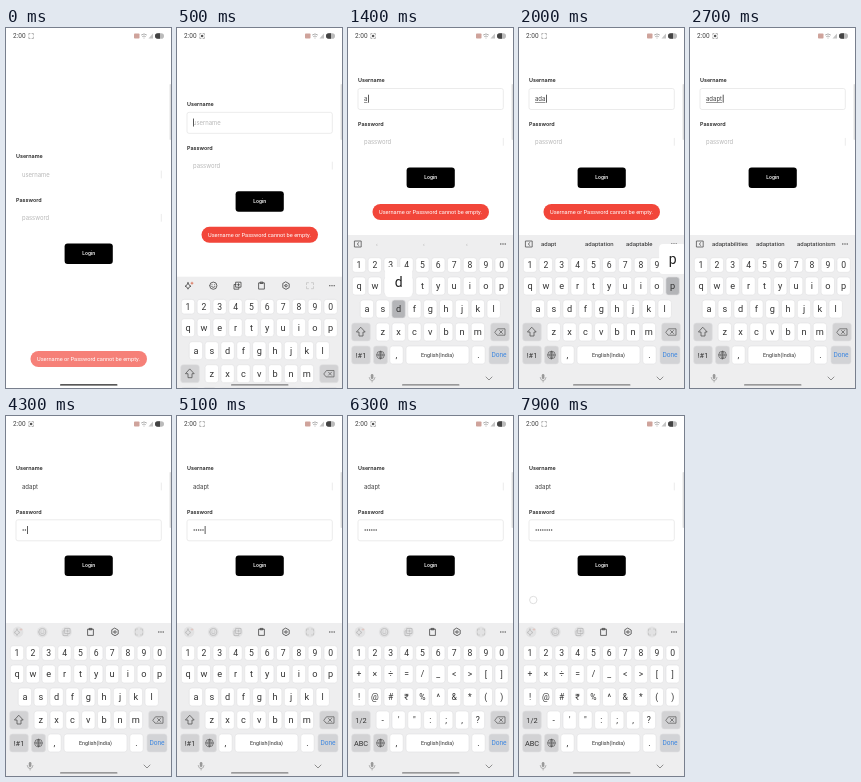
Recreate the animation shown at these times as an HTML page. Size 165x360 px, loop 8000 ms.

```html
<!DOCTYPE html>
<html lang="en">
<head>
<meta charset="utf-8">
<title>Login form</title>
<style>
  html, body { margin: 0; width: 100%; height: 100%; overflow: hidden; background: #fff; }
  svg { display: block; width: 100vw; height: 100vh; }
  text { font-family: Roboto, sans-serif; white-space: pre; }
  .form text { font-family: Inter, sans-serif; }
</style>
</head>
<body>
<svg id="stage" viewBox="0 0 165 360"></svg>
<script>
const LOOP = 8000;
const NAME = "adapt";
const stage = document.getElementById("stage");

function el(parent, tag, attrs = {}, content) {
  const node = document.createElementNS("http://www.w3.org/2000/svg", tag);
  for (const key in attrs) node.setAttribute(key, attrs[key]);
  if (content !== undefined) node.textContent = content;
  parent.append(node);
  return node;
}
const group = (parent, attrs) => el(parent, "g", attrs);
const box = (parent, x, y, width, height, rx, fill, more) =>
  el(parent, "rect", { x, y, width, height, rx, fill, ...more });
const line = (parent, d, stroke = "#333", width = 0.8, more) =>
  el(parent, "path", { d, stroke, "stroke-width": width, fill: "none",
    "stroke-linecap": "round", "stroke-linejoin": "round", ...more });
// y is the vertical middle of the capitals
const label = (parent, s, x, y, size, more) =>
  el(parent, "text", { x, y: y + size * 0.36, "font-size": size, fill: "#222", ...more }, s);
const mid = { "text-anchor": "middle" };
const show = (node, on) => node.setAttribute("opacity", +on);
const move = (node, y) => node.setAttribute("transform", `translate(0 ${y})`);

function track(steps, t) {
  if (t <= steps[0][0]) return steps[0][1];
  for (let i = 1; i < steps.length; i++) {
    const [t0, a] = steps[i - 1], [t1, b] = steps[i];
    if (t < t1) return a + (b - a) * (t - t0) / (t1 - t0);
  }
  return steps[steps.length - 1][1];
}

// Status bar
const status = group(stage);
label(status, "2:00", 7, 8, 6.5, { fill: "#444" });
line(status, "M24 5.5H22.8V7M26 5.5H27.4V7M24 10.5H22.8V9M26 10.5H27.4V9", "#999", 0.7);
const recordDot = el(status, "circle", { cx: 25.1, cy: 8, r: 1.3, fill: "#555" });
box(status, 128, 5.5, 5.5, 5, 0.8, "#cfa39b");
line(status, "M135.5 6.8Q138 4.8 140.5 6.8M136.6 8.4Q138 7.3 139.4 8.4M138 10V10.1", "#999", 0.8);
el(status, "path", { d: "M142.5 10.5L147 5.5V10.5Z", fill: "#c4c4c4" });
box(status, 149, 5.2, 9, 5.6, 2.8, "#bbb");
el(status, "path", { d: "M151.8 5.2H154V10.8H151.8A2.8 2.8 0 0 1 151.8 5.2", fill: "#444" });
box(stage, 163.6, 56, 1.4, 56, 0.7, "#ddd");

// Form
const form = group(stage, { class: "form" });
function makeField(title, hint, y) {
  label(form, title, 10, y + 0.5, 5.4, { "font-weight": 600 });
  const idle = line(form, `M155.3 ${y + 15}V${y + 22}`, "#e2e2e2", 0.7);
  const focus = box(form, 10, y + 8.5, 145.3, 21, 2, "none", { stroke: "#e6e6e6", "stroke-width": 0.8 });
  const textY = y + 18.7;
  return {
    idle, focus,
    hint: label(form, hint, 16, textY, 5.9, { fill: "#b8b8b8" }),
    text: label(form, "", 16, textY, 6, { fill: "#444" }),
    underline: box(form, 16, textY + 3.4, 0, 0.6, 0, "#555"),
    cursor: box(form, 16, textY - 4, 0.8, 8, 0, "#333")
  };
}
const user = makeField("Username", "username", 52);
const pass = makeField("Password", "password", 95.3);
pass.dots = Array.from({ length: 8 }, (_, i) =>
  el(form, "circle", { cx: 17.2 + 2.2 * i, cy: 114, r: 0.75, fill: "#444" }));
box(form, 58.6, 139.5, 48.2, 20.4, 3, "#000");
label(form, "Login", 82.7, 149.6, 4.8, { ...mid, fill: "#fff", "font-weight": 600 });

const spinner = el(stage, "circle", { cx: 14.3, cy: 184, r: 3.7, fill: "#fff", stroke: "#d2d2d2", "stroke-width": 0.7 });
const toast = group(stage);
box(toast, 24.5, 323, 116.5, 16, 8, "#f2463a");
label(toast, "Username or Password cannot be empty.", 82.5, 331, 5.65, { ...mid, fill: "#fff" });

// Keyboard
const board = group(stage);
box(board, 0, 207, 165, 154, 0, "#eeeeef");
const letters = group(board), symbols = group(board);
const keys = {};
function addKey(parent, s, x, y, { w = 13.4, h = 18, fill = "#fff", size = 9.2, ink = "#333" } = {}) {
  const face = box(parent, x - w / 2, y - h / 2, w, h, 2.8, fill, { stroke: "#e0e0e1", "stroke-width": 0.6 });
  if (s) label(parent, s, x, y, size, { ...mid, fill: ink });
  keys[s] = { face, x, y, fill };
}
function addRow(parent, chars, x, y, options) {
  [...chars].forEach((c, i) => addKey(parent, c, x + 15.85 * i, y, options));
}
const grey = { w: 18.6, fill: "#d2d2d4", size: 7.4 };
addRow(letters, "qwertyuiop", 11, 258);
addRow(letters, "asdfghjkl", 18.9, 281);
addRow(letters, "zxcvbnm", 34.8, 304);
addKey(letters, "", 13, 304, grey);
addKey(letters, "!#1", 13, 327, grey);
line(letters, "M13 299.5L17.2 304H15V308H11V304H8.8Z", "#555");
addRow(symbols, "+×÷=/_<>[]", 11, 258, { size: 8.6 });
addRow(symbols, "!@#₹%^&*()", 11, 281, { size: 8.6 });
addRow(symbols, "-'\":;,?", 34.8, 304, { size: 8.6 });
addKey(symbols, "1/2", 13, 304, grey);
addKey(symbols, "ABC", 13, 327, grey);
addRow(board, "1234567890", 11, 237, { h: 14.6, size: 8.6 });
addKey(board, "", 152, 304, grey);
line(board, "M147 304L149.5 300.8H157V307.2H149.5ZM151.5 302.5L154.5 305.5M154.5 302.5L151.5 305.5", "#555", 0.7);
addKey(board, "", 32.5, 327, { ...grey, w: 14 });
line(board, "M28.7 327A3.8 3.8 0 1 0 36.3 327A3.8 3.8 0 1 0 28.7 327H36.3M32.5 323.2Q29.2 327 32.5 330.8Q35.8 327 32.5 323.2V330.8", "#555", 0.7);
addRow(board, ",", 48.5, 327);
addKey(board, "English(India)", 89.5, 327, { w: 63, size: 5.4 });
addRow(board, ".", 130.5, 327);
addKey(board, "Done", 151, 327, { w: 20, fill: "#d2d3d6", size: 6.6, ink: "#3f88e0" });
box(board, 22.8, 346, 2.6, 5, 1.3, "#999");
line(board, "M21.2 349.5Q21.4 352.5 24.1 352.5Q26.8 352.5 27 349.5M24.1 352.5V354", "#999", 0.7);
line(board, "M138 349L141 352L144 349", "#777");

// Toolbar: icons or word suggestions
const tools = group(board), faded = group(tools), words = group(board);
const icon = (parent, x, d, stroke = "#444") =>
  line(parent, d, stroke, 0.8, { transform: `translate(${x} 216)` });
const ringPath = r => `M${-r} 0A${r} ${r} 0 1 0 ${r} 0A${r} ${r} 0 1 0 ${-r} 0`;
const discs = group(tools);
[12, 36.3, 60.5, 133].forEach(cx => el(discs, "circle", { cx, cy: 216, r: 5.4, fill: "#e2e2e3" }));
tools.prepend(discs);
icon(faded, 12, "M-1 -3Q-.5 0 2 .5Q-.5 1 -1 3.5Q-1.5 1 -4 .5Q-1.5 0 -1 -3Z");
icon(faded, 12, "M3 -3.5V-1.5M2 -2.5H4", "#d8684c");
icon(faded, 36.3, ringPath(3.6) + "M-1.3 -1V-.9M1.3 -1V-.9M-1.7 1Q0 2.6 1.7 1");
icon(faded, 60.5, "M-1.5 -3.5H3.5V1.5H-1.5ZM-1.5 -1.2H-3.5V3.5H1.3V1.5M0 -1H2M1 -2V0");
icon(tools, 84.7, "M-2.7 -2.8H2.7V3.4H-2.7ZM-1.2 -3.6H1.2V-2.2H-1.2Z");
icon(tools, 109, "M0 -3.7L3.2 -1.9V1.9L0 3.7L-3.2 1.9V-1.9Z" + ringPath(1.2));
icon(tools, 133, "M-1.5 -3H-3.5V-1M1.5 -3H3.5V-1M-1.5 3H-3.5V1M1.5 3H3.5V1", "#c4c4c4");
icon(words, 10, "M-3.2 -3H3.2V3H-3.2ZM.8 -1.4L-.8 0L.8 1.4", "#555");
[152.8, 155, 157.2].forEach(cx => el(board, "circle", { cx, cy: 216, r: 0.65, fill: "#444" }));
const suggestionTexts = [22, 66, 107].map(x => label(words, "", x, 216, 6));
const chevrons = group(words);
[28, 75, 118].forEach(x => label(chevrons, "‹", x, 216, 5.5, { fill: "#aaa" }));

const popup = group(stage);
const popupBox = box(popup, 0, 239, 27, 30, 4, "#fff");
const popupText = label(popup, "", 0, 0, 14, mid);
const navBar = box(stage, 54, 356.2, 57.5, 1.4, 0.7, "#222");

// Timeline
const FOCUS_USER = 200, FOCUS_PASS = 3300, SYMBOLS = 5300;
const userTimes = [1100, 1450, 1750, 2050, 2350];
const passTimes = [3900, 4200, 4500, 4750, 5050, 5700, 6800, 7200];
const presses = [
  ...userTimes.map((at, i) => ({ at, key: NAME[i], popup: true })),
  ...passTimes.map((at, i) => ({ at, key: (NAME + "@12")[i] })),
  { at: SYMBOLS, key: "!#1" }
];
const suggestions = [
  [1450, ["ad", "add", "ads"]],
  [1750, ["adapt", "adaptation", "adaptable"]],
  [2350, ["adaptabilities", "adaptation", "adaptationism"]]
];
const boardY = [[250, 153], [350, 120], [500, 42], [600, 11], [750, 0]];
const formY = [[250, 76], [350, 58], [500, 24], [600, 7], [750, 0]];
const toastY = [[250, 0], [350, -52], [500, -124], [600, -140], [750, -147]];
const toastAlpha = [[0, 0.68], [150, 1], [2000, 1], [2250, 0]];
const navAlpha = [[300, 1], [500, 0.55]];
const spinnerAlpha = [[7500, 0], [7700, 1]];

const countBefore = (times, t) => times.filter(at => at <= t).length;
const lastBefore = (times, start, t) => Math.max(start, ...times.filter(at => at <= t));

function drawField(field, focused, times, start, t, width) {
  show(field.focus, focused);
  show(field.idle, !focused);
  const blinkOn = (t - lastBefore(times, start, t)) % 1000 < 500;
  show(field.cursor, focused && blinkOn);
  field.cursor.setAttribute("x", 16 + width + (width ? 0.7 : 0));
}

function draw(t) {
  move(board, track(boardY, t));
  move(form, track(formY, t));
  move(toast, track(toastY, t));
  show(toast, track(toastAlpha, t));
  show(navBar, track(navAlpha, t));
  show(spinner, track(spinnerAlpha, t));
  const phase = t % 1000;
  show(recordDot, phase >= 220 && phase < 720);

  const onUser = t >= FOCUS_USER && t < FOCUS_PASS;
  const onPass = t >= FOCUS_PASS;
  const typed = countBefore(userTimes, t), hidden = countBefore(passTimes, t);
  user.text.textContent = NAME.slice(0, typed);
  const width = typed ? user.text.getComputedTextLength() : 0;
  show(user.hint, !typed);
  user.underline.setAttribute("width", onUser ? width : 0);
  drawField(user, onUser, userTimes, FOCUS_USER, t, width);
  show(pass.hint, !hidden);
  pass.dots.forEach((dot, i) => show(dot, i < hidden));
  drawField(pass, onPass, passTimes, FOCUS_PASS, t, hidden * 2.2);

  const wordMode = onUser && typed > 0;
  show(words, wordMode);
  show(tools, !wordMode);
  show(discs, onPass);
  show(faded, onPass ? 0.25 : 1);
  const current = suggestions.filter(([at]) => at <= t).pop();
  show(chevrons, !current);
  suggestionTexts.forEach((node, i) => { node.textContent = current ? current[1][i] : ""; });

  show(letters, t < SYMBOLS);
  show(symbols, t >= SYMBOLS);
  for (const k in keys) keys[k].face.setAttribute("fill", keys[k].fill);
  const press = presses.find(p => t >= p.at - 130 && t < p.at + 20);
  show(popup, press && press.popup ? 1 : 0);
  if (press) {
    const key = keys[press.key];
    key.face.setAttribute("fill", "#b4b5b8");
    if (press.popup) {
      popupBox.setAttribute("x", key.x - 13.5);
      popupBox.setAttribute("y", key.y - 42);
      popupText.setAttribute("x", key.x);
      popupText.setAttribute("y", key.y - 22);
      popupText.textContent = press.key;
    }
  }
}

const begin = performance.now();
function frame() {
  draw((performance.now() - begin) % LOOP);
  requestAnimationFrame(frame);
}
frame();
</script>
</body>
</html>
```
